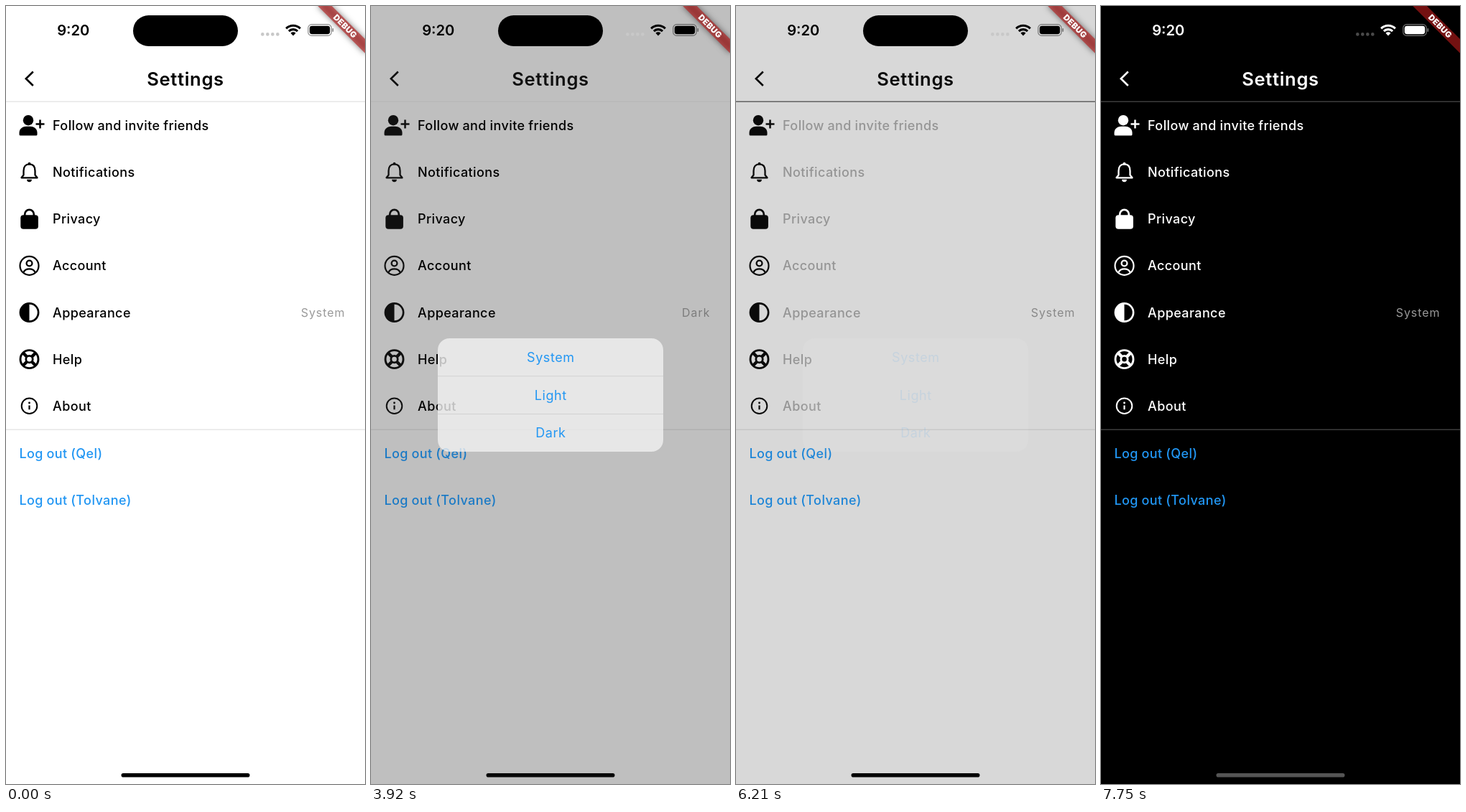
An HTML page with a canvas for the animation above (8000 ms loop, 500 by 1084 pixels).

```html
<!DOCTYPE html>
<html lang="en">
<head>
<meta charset="utf-8">
<title>Settings</title>
<style>
html, body { margin: 0; width: 100%; height: 100%; overflow: hidden; background: #fff; }
canvas { display: block; width: 500px; height: 1084px; }
</style>
</head>
<body>
<canvas id="stage" width="500" height="1084"></canvas>
<script>
const W = 500, H = 1084, LOOP = 8000, ROW = 65.13;
const canvas = document.getElementById('stage');
const ctx = canvas.getContext('2d');
const BLUE = '#2196f3';

// open time, close time, barrier strength
const dialogs = [[492, 1657, 0.2], [2662, 3905, 0.2], [4992, 6020, 0.478]];
// theme start, status bar start, dark or not
const themes = [[3905, 3960, 1], [6020, 6070, 0], [7279, 7215, 1]];
const choices = [[0, 'System'], [1665, 'Light'], [3915, 'Dark'], [6035, 'System']];

const clamp = x => Math.max(0, Math.min(1, x));
const mix = (a, b, k) => a + (b - a) * k;
const gray = (a, b, k) => {
  const v = Math.round(mix(a, b, k));
  return `rgb(${v},${v},${v})`;
};

function bezier(x1, y1, x2, y2) {
  const at = (a, b, s) => 3 * a * s * (1 - s) ** 2 + 3 * b * s * s * (1 - s) + s ** 3;
  return x => {
    if (x <= 0 || x >= 1) return clamp(x);
    let lo = 0, hi = 1;
    for (let i = 0; i < 18; i++) {
      const mid = (lo + hi) / 2;
      if (at(x1, x2, mid) < x) lo = mid; else hi = mid;
    }
    return at(y1, y2, lo);
  };
}
const ease = bezier(0.25, 0.1, 0.25, 1);
const easeInOut = bezier(0.42, 0, 0.58, 1);
const settle = bezier(0.35, 0.91, 0.33, 0.97);

// A 200 ms tween that is retargeted while the theme itself is still moving.
function lagged(u) {
  if (u <= 0) return 0;
  return u < 1 ? u - 1 + Math.exp(-u) : clamp(mix(Math.exp(-1), 1, u - 1));
}

function themeAt(t) {
  const th = { main: 0, text: 0, line: 0, status: 0 };
  for (const [start, bar, to] of themes) {
    const u = (t - start) / 200;
    th.main = mix(th.main, to, clamp(u));
    th.text = mix(th.text, to, lagged(u));
    th.line = mix(th.line, to, clamp(u - 1));
    th.status = mix(th.status, to, clamp((t - bar) / 100));
  }
  return th;
}

function dialogAt(t) {
  for (const [open, close, dim] of dialogs) {
    if (t < open || t > close + 250) continue;
    if (t < close) {
      const x = clamp((t - open) / 250);
      return { dim: dim * ease(x), alpha: easeInOut(x), scale: mix(1.3, 1, settle(x)) };
    }
    const x = 1 - (t - close) / 250;
    return { dim: dim * x, alpha: easeInOut(x), scale: 1 };
  }
  return null;
}

function text(str, x, y, size, color, { weight = 400, gap = 0.4, align = 'left' } = {}) {
  ctx.font = `${weight} ${size}px Inter, sans-serif`;
  ctx.letterSpacing = gap + 'px';
  ctx.wordSpacing = '-0.5px';
  ctx.textAlign = align;
  ctx.textBaseline = 'alphabetic';
  ctx.fillStyle = color;
  ctx.fillText(str, x, y);
}

function box(x, y, w, h, r) {
  ctx.beginPath();
  ctx.roundRect(x, y, w, h, r);
}

function stroke(d, width) {
  ctx.lineWidth = width;
  ctx.stroke(new Path2D(d));
}

function ring(x, y, r, width) {
  ctx.lineWidth = width;
  ctx.beginPath();
  ctx.arc(x, y, r, 0, 7);
  ctx.stroke();
}

function disc(x, y, r) {
  ctx.beginPath();
  ctx.arc(x, y, r, 0, 7);
  ctx.fill();
}

// Icons are drawn around the centre of their row.
const icons = [
  () => {
    disc(-1.5, -7.3, 7.2);
    ctx.fill(new Path2D('M-14 12.5 V10 C-14 4.5 -9 1.2 -4 1.2 H1 C6 1.2 11 4.5 11 10 V12.5 Q11 14 9.5 14 H-12.5 Q-14 14 -14 12.5 Z'));
    stroke('M9 -2 H21 M15 -8 V4', 2.5);
  },
  () => {
    stroke('M-11 7.7 L-8 3.9 V-2 C-8 -8 -5 -11.3 0 -11.3 C5 -11.3 8 -8 8 -2 V3.9 L11 7.7 Z', 2.3);
    disc(0, -12, 1.9);
    ctx.beginPath();
    ctx.arc(0, 10.2, 3.4, 0, Math.PI);
    ctx.fill();
  },
  () => {
    box(-12.2, -5.6, 24.6, 19.6, 4);
    ctx.fill();
    stroke('M-6.3 -4 V-6.6 A6.3 6.3 0 0 1 6.3 -6.6 V-4', 2.7);
  },
  () => {
    ring(0, 0, 13, 2.2);
    ring(0, -3.4, 3.9, 2.3);
    stroke('M-8.2 9.4 C-6.8 5.6 -3.5 4.4 0 4.4 C3.5 4.4 6.8 5.6 8.2 9.4', 2.3);
  },
  () => {
    ring(0, 0, 12.6, 2.7);
    ctx.beginPath();
    ctx.arc(0, 0, 12.6, Math.PI / 2, Math.PI * 1.5);
    ctx.fill();
  },
  () => {
    ring(0, 0, 12.5, 2.9);
    ring(0, 0, 4.7, 2.8);
    for (let i = 0; i < 4; i++) {
      ctx.rotate(Math.PI / 2);
      stroke('M3.8 3.8 L8.6 8.6', 4.4);
    }
  },
  () => {
    ring(0, 0, 10.8, 2);
    disc(0, -4.3, 1.4);
    stroke('M0 -0.8 V5', 2.2);
  }
];
const labels = ['Follow and invite friends', 'Notifications', 'Privacy', 'Account',
  'Appearance', 'Help', 'About'];

function drawPage(t, th) {
  const ink = gray(0, 255, th.main);
  ctx.fillStyle = gray(255, 0, th.main);
  ctx.fillRect(0, 0, W, H);

  ctx.strokeStyle = ink;
  stroke('M37.8 91.5 L27.8 101.3 L37.8 111', 2.6);
  text('Settings', 250, 110.6, 25.6, ink, { weight: 600, gap: 0.7, align: 'center' });
  ctx.fillStyle = gray(224, 76, th.line);
  ctx.fillRect(0, 132.6, W, 1.2);
  ctx.fillStyle = gray(224, 76, th.main);
  ctx.fillRect(0, 589.6, W, 1.2);

  labels.forEach((label, i) => {
    const y = 166.5 + ROW * i;
    ctx.save();
    ctx.translate(32.5, y);
    ctx.fillStyle = ctx.strokeStyle = ink;
    ctx.lineJoin = 'round';
    icons[i]();
    ctx.restore();
    text(label, 65, y + 6.5, 18, gray(0, 255, th.text), { weight: 500 });
  });

  const choice = choices.filter(c => c[0] <= t).pop()[1];
  text(choice, 472.5, 432.6, 16, '#999', { gap: 0.95, align: 'right' });
  text('Log out (Qel)', 18.5, 630, 18, BLUE, { weight: 500 });
  text('Log out (Tolvane)', 18.5, 695.2, 18, BLUE, { weight: 500 });
}

function drawDialog(d, th) {
  ctx.fillStyle = `rgba(0,0,0,${d.dim})`;
  ctx.fillRect(0, 0, W, H);

  const x = 93, y = 463, w = 314, h = 158;
  const dark = th.main > 0.5;
  ctx.save();
  ctx.translate(250, 542);
  ctx.scale(d.scale, d.scale);
  ctx.translate(-250, -542);
  box(x, y, w, h, 16.3);
  ctx.clip();
  if (d.alpha === 1) {
    ctx.filter = 'blur(23px)';
    ctx.drawImage(canvas, 23, 393, 454, 298, 23, 393, 454, 298);
    ctx.filter = 'none';
  }
  ctx.globalAlpha = d.alpha;
  ctx.fillStyle = dark ? 'rgba(45,45,45,0.8)' : 'rgba(242,242,242,0.8)';
  ctx.fillRect(x, y, w, h);
  ctx.fillStyle = gray(210, 64, dark);
  ctx.fillRect(x, 515.2, w, 1);
  ctx.fillRect(x, 568, w, 1);
  ['System', 'Light', 'Dark'].forEach((s, i) =>
    text(s, 250.3, 496 + 52.7 * i, 18, BLUE, { gap: 0.55, align: 'center' }));
  ctx.restore();
}

function drawBanner() {
  ctx.save();
  ctx.translate(W, 0);
  ctx.rotate(Math.PI / 4);
  // The shadow is cast from a shape far off the stage.
  ctx.shadowColor = 'rgba(0,0,0,0.5)';
  ctx.shadowBlur = 9;
  ctx.shadowOffsetX = 2000;
  ctx.fillStyle = '#000';
  ctx.save();
  ctx.rotate(-Math.PI / 4);
  ctx.translate(-2000, 0);
  ctx.rotate(Math.PI / 4);
  ctx.fillRect(-46.5, 32.6, 93, 13.9);
  ctx.restore();
  ctx.shadowColor = 'transparent';
  ctx.fillStyle = 'rgba(183,28,28,0.627)';
  ctx.fillRect(-46.5, 32.6, 93, 13.9);
  text('DEBUG', 0.4, 43.5, 11.4, '#fff', { weight: 900, gap: 0.3, align: 'center' });
  ctx.restore();
}

function drawStatus(th) {
  const ink = gray(0, 255, th.status);
  text('9:20', 93.8, 41.3, 20.2, ink, { weight: 600, gap: 0, align: 'center' });

  ctx.fillStyle = '#000';
  box(177, 13, 146, 43, 21.5);
  ctx.fill();

  ctx.fillStyle = gray(200, 74, th.status);
  for (let i = 0; i < 4; i++) disc(357.3 + 7 * i, 39.4, 2.3);

  ctx.strokeStyle = ctx.fillStyle = ink;
  ctx.lineWidth = 3.1;
  for (const r of [8.6, 13.9]) {
    ctx.beginPath();
    ctx.arc(400, 41.2, r, -Math.PI * 0.75, -Math.PI * 0.25);
    ctx.stroke();
  }
  ctx.beginPath();
  ctx.moveTo(400, 41.4);
  ctx.arc(400, 41.2, 5, -Math.PI * 0.75, -Math.PI * 0.25);
  ctx.fill();

  box(422.8, 27.8, 28.4, 11.4, 3.4);
  ctx.fill();
  ctx.globalAlpha = 0.45;
  ctx.lineWidth = 1.2;
  box(420.8, 25.6, 32.4, 15.8, 5);
  ctx.stroke();
  box(454.4, 31, 1.8, 5, 1);
  ctx.fill();
  ctx.globalAlpha = 1;

  ctx.fillStyle = gray(0, 85, th.main);
  box(160.5, 1069, 179, 5.6, 2.8);
  ctx.fill();
}

function draw(now) {
  const t = now % LOOP;
  const th = themeAt(t);
  const dialog = dialogAt(t);
  drawPage(t, th);
  if (dialog) drawDialog(dialog, th);
  drawBanner();
  drawStatus(th);
}

function tick() {
  draw(performance.now());
  requestAnimationFrame(tick);
}
tick();
</script>
</body>
</html>
```
